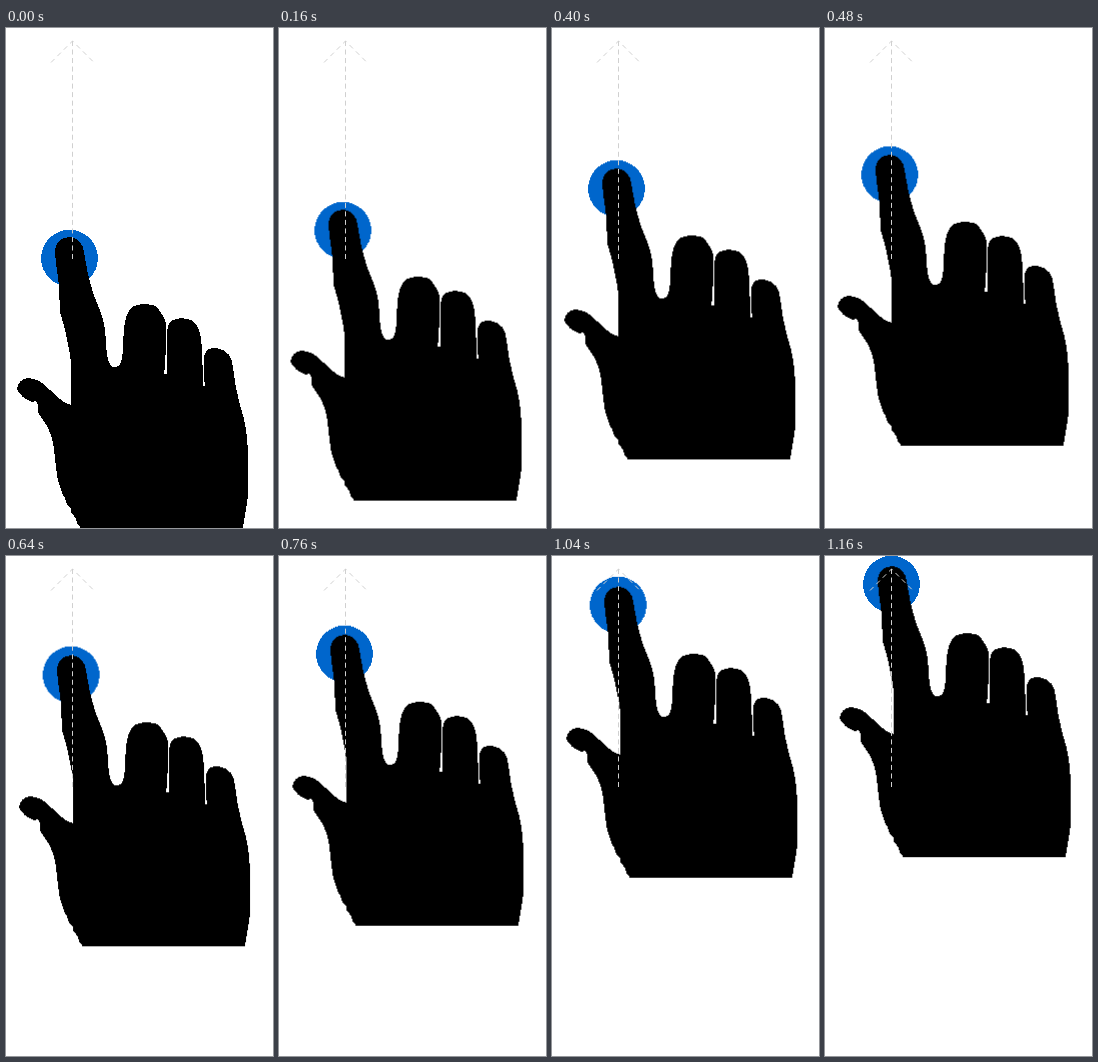
Write an HTML page that moves like this. It is 267 by 500 pixels and loops after 1.2 s.

```html
<!DOCTYPE html>
<html lang="en">
<head>
<meta charset="utf-8">
<title>Swipe up</title>
<style>
  html, body { margin: 0; width: 100%; height: 100%; overflow: hidden; background: #fff; }
  svg { display: block; width: 100%; height: 100%; }
  .dot, .hand { shape-rendering: crispEdges; animation: 1200ms steps(30, end) infinite; }
  .dot { fill: #06c; animation-name: dot; }
  .hand { fill: #000; animation-name: hand; }
  .arrow { fill: none; stroke: #d0d0d0; stroke-width: 1; }
  .shaft { stroke-dasharray: 5 3.52; }
  .head { stroke-dasharray: 5 4; }
  @keyframes dot { to { transform: translate(3.1px, -209px); } }
  @keyframes hand { to { transform: translate(3.8px, -205.7px); } }
</style>
</head>
<body>
<svg viewBox="0 0 267 500">
  <circle class="dot" cx="63.5" cy="230.2" r="28.4"/>
  <path class="hand" d="
    M63.5 209 C55 209 49 215 49 223 C49.3 236 52.5 248 53 259
    C53.5 270 53.5 278 54.5 286 C56 293 59 299 60 306 C62 318 65 328 65.3 340 L65.5 377
    C61 376 57 374 54 371 C50 368 47 365 44 362
    C38 355 30 350 22 350 C16 351 11 355 11 361
    C13 367 20 372 26 374 L30 373 C33 375 31 381 32.5 385
    C35 390 39 394 41 398 C45 406 47 413 48 421
    C49 431 50 441 51.5 450 L54 459 L57 467 L59 470 L60 474 L63 479
    L65 481 L65 484 L68 488 L70 491 L71 495 L75 500.4 L236.8 500.4
    C239 485 242.5 473 242.5 455 C242.5 435 242.3 412 239 396
    C237 385 233 376 231 364 C228 352 228 342 225.5 332
    C223 324 216 320 208 320 C202 320 198 323 198 331
    L198.6 358 L197 358 C196.6 345 196.8 335 195.5 316
    C195 307 194 302 189 295 C185 290 173 289 167 292
    C162 294 161.2 299 161.2 306 L160.8 346 L158.3 346
    C159 330 160.8 318 160.5 300 C160 290 155 285 151 279
    C147 276 134 275 128 278 C121 282 119 292 118 300
    C117 312 117.5 323 115.5 332 C114 341 105 342 102.5 333
    C99.5 324 100.5 312 98.8 301 C97.5 286 90 276 86 261
    C82 249 80.5 238 78 224 C77 215 71 209 63.5 209 Z"/>
  <g class="arrow">
    <path class="shaft" d="M66.5 231V13"/>
    <path class="head" d="M45 34.5L66.5 13L88 34.5"/>
  </g>
</svg>
</body>
</html>
```
